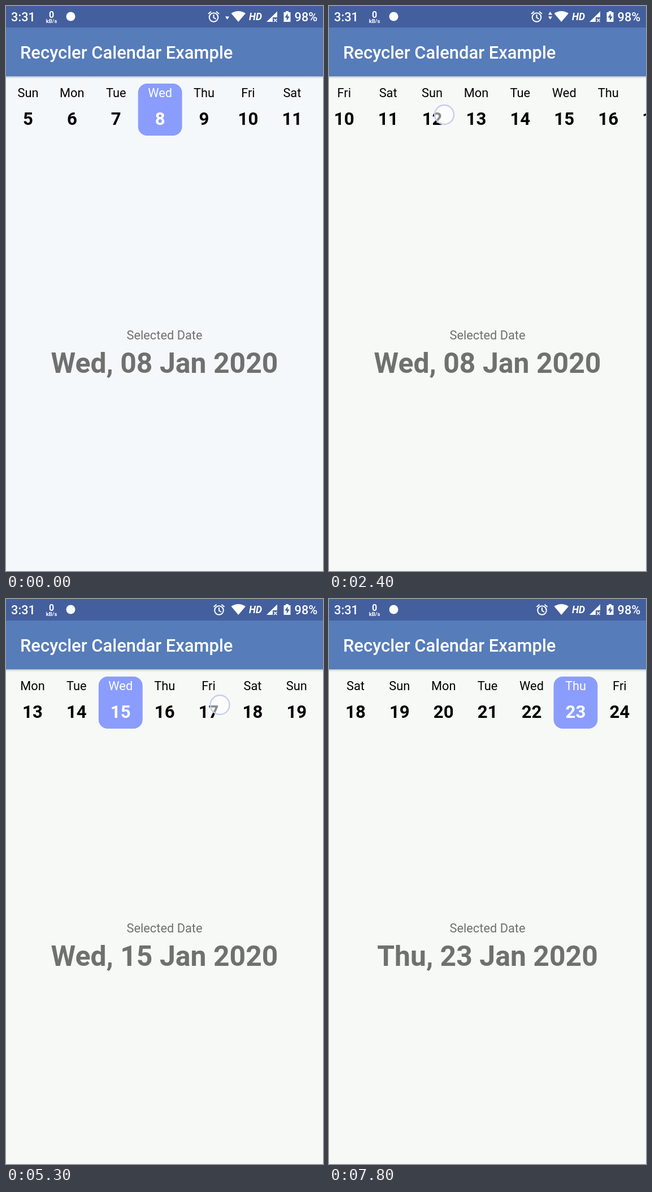
Animation, 561 px wide and 998 px high, one loop 8000 ms. Source, as an HTML page:

```html
<!DOCTYPE html>
<html lang="en">
<head>
<meta charset="utf-8">
<title>Calendar strip</title>
<style>
html, body { margin: 0; width: 100%; height: 100%; overflow: hidden; }
svg { display: block; width: 561px; height: 998px; font-family: Roboto, sans-serif; }
.mid { text-anchor: middle; }
.day { font-size: 21.8px; }
.num { font-size: 31.2px; font-weight: 700; }
</style>
</head>
<body>
<svg viewBox="0 0 561 998">
  <defs>
    <linearGradient id="shade" x2="0" y2="1">
      <stop stop-color="#000" stop-opacity=".16"/>
      <stop offset="1" stop-color="#000" stop-opacity="0"/>
    </linearGradient>
  </defs>
  <rect id="page" width="561" height="998"/>
  <g id="strip">
    <rect id="mark" y="137" width="77.9" height="92" rx="16" fill="#8a9dfd"/>
  </g>
  <circle id="touch" r="17" fill="#fff" fill-opacity=".55" stroke="#c6cdec" stroke-width="2.4"/>
  <g class="mid" fill="#6f716f">
    <text x="280.5" y="588.5" class="day">Selected Date</text>
    <text x="280.5" y="648" font-size="49.9" font-weight="700" id="date"></text>
  </g>

  <rect width="561" height="124.300" fill="#567cb9"/>
  <rect y="124.300" width="561" height="4.500" fill="url(#shade)"/>
  <rect width="561" height="38" fill="#435f9e"/>
  <g fill="#fff" font-weight="500">
    <text x="25" y="93" font-size="30.95">Recycler Calendar Example</text>
    <text x="9" y="27" font-size="21.8">3:31</text>
    <text x="510.5" y="27" font-size="21.8">98%</text>
    <g class="mid" font-weight="700">
      <text x="80.5" y="21" font-size="16">0</text>
      <text x="80.5" y="30" font-size="9.5">kB/s</text>
      <text x="441.5" y="25" font-size="17.5" font-style="italic">HD</text>
    </g>
    <circle cx="114.5" cy="18.5" r="8"/>
    <g id="alarm" fill="none" stroke="#fff" stroke-width="2">
      <circle cy="20" r="7.8"/>
      <path d="M0 15v5.5l4 2.5M-9.5 14l5-4.2M9.5 14l-5-4.2"/>
    </g>
    <path id="up" d="M388 15.5h7l-3.5-5.5z"/>
    <path id="down" d="M388 18.5h7l-3.5 5.5z"/>
    <path d="M398.5 13Q411 5 424 13L411.2 28z"/>
    <path d="M480 9.5V20H472V28H461z"/>
    <path d="M474 22.5l5.5 5.5m0-5.5l-5.5 5.5" stroke="#fff" stroke-width="1.7"/>
    <path d="M491.5 11h3.5V9h5v2h3.5v17h-12z"/>
    <path d="M498.5 13l-5 7.5h3.3V26l5-7.5h-3.3z" fill="#435f9e"/>
  </g>
</svg>
<script>
const LOOP = 8000, STEP = 100, SETTLE = 400, FADE = 300, CELL = 77.9;
const NAMES = ['Sun', 'Mon', 'Tue', 'Wed', 'Thu', 'Fri', 'Sat'];
const $ = id => document.getElementById(id);
const clamp = v => Math.min(1, Math.max(0, v));
const easeOut = p => 1 - (1 - p) ** 3;
const centre = day => (day - 4.5) * CELL;

// The strip follows the finger for `drag` pixels, then settles at `gain`
const swipe = (press, release, x, y, drag, gain) => ({ press, release, x, y, drag, gain });
const swipes = [
  swipe(1000, 1400, 405, 190, 225, 3 * CELL - 8),
  swipe(2100, 2400, 380, 192, 176, 2 * CELL),
  swipe(4400, 4800, 301, 182, 146, 3 * CELL),
  swipe(6100, 6400, 467, 190, 290, 5 * CELL)
];

const dragged = (s, t) => s.drag * clamp((t - s.press) / (s.release - s.press));
const scrollAt = t => swipes.reduce((sum, s) =>
  sum + dragged(s, t) + (s.gain - s.drag) * easeOut(clamp((t - s.release) / SETTLE)), 0);

const tap = (press, day) =>
  ({ press, release: press + 50, x: centre(day) - scrollAt(press) + 20, y: 187, drag: 0, day });
const taps = [tap(3000, 13), tap(4100, 15), tap(5300, 17), tap(6900, 23)];
const gestures = [...swipes, ...taps].sort((a, b) => a.press - b.press);

const dayName = d => NAMES[(d + 2) % 7];
const cells = [];
for (let d = 5; d <= 31; d++) {
  const g = document.createElementNS('http://www.w3.org/2000/svg', 'g');
  g.innerHTML = `<text class="mid day" x="${centre(d)}" y="161">${dayName(d)}</text>
    <text class="mid num" x="${centre(d)}" y="210">${d}</text>`;
  $('strip').append(g);
  cells[d] = g;
}

function set(id, attrs) {
  for (const name in attrs) $(id).setAttribute(name, attrs[name]);
}

function drawTouch(t) {
  const g = gestures.findLast(g => g.press <= t);
  if (!g) return set('touch', { opacity: 0 });
  set('touch', { cx: g.x - dragged(g, t), cy: g.y, opacity: 1 - clamp((t - g.release) / FADE) });
}

function drawStatus(t) {
  const both = t >= 2200 && t < 2800 || t >= 5500 && t < 6500;
  const down = both || t < 2200;
  set('up', { opacity: +both });
  set('down', { opacity: +down });
  set('alarm', { transform: `translate(${down ? 367.5 : 377})` });
}

function draw(t) {
  const p = clamp((t - 300) / 400);
  set('page', { fill: `rgb(${245 + 2 * p},${248 + p},${251 - 4 * p})` });
  set('strip', { transform: `translate(${-scrollAt(t)})` });
  const day = taps.findLast(g => g.release <= t)?.day ?? 8;
  set('mark', { x: centre(day) - CELL / 2 });
  cells.forEach((c, d) => c.setAttribute('fill', d === day ? '#fff' : '#000'));
  $('date').textContent = `${dayName(day)}, ${String(day).padStart(2, '0')} Jan 2020`;
  drawTouch(t);
  drawStatus(t);
}

const start = performance.now();
function tick() {
  const t = (performance.now() - start) % LOOP;
  draw(Math.floor(t / STEP) * STEP);
  requestAnimationFrame(tick);
}
tick();
</script>
</body>
</html>
```
